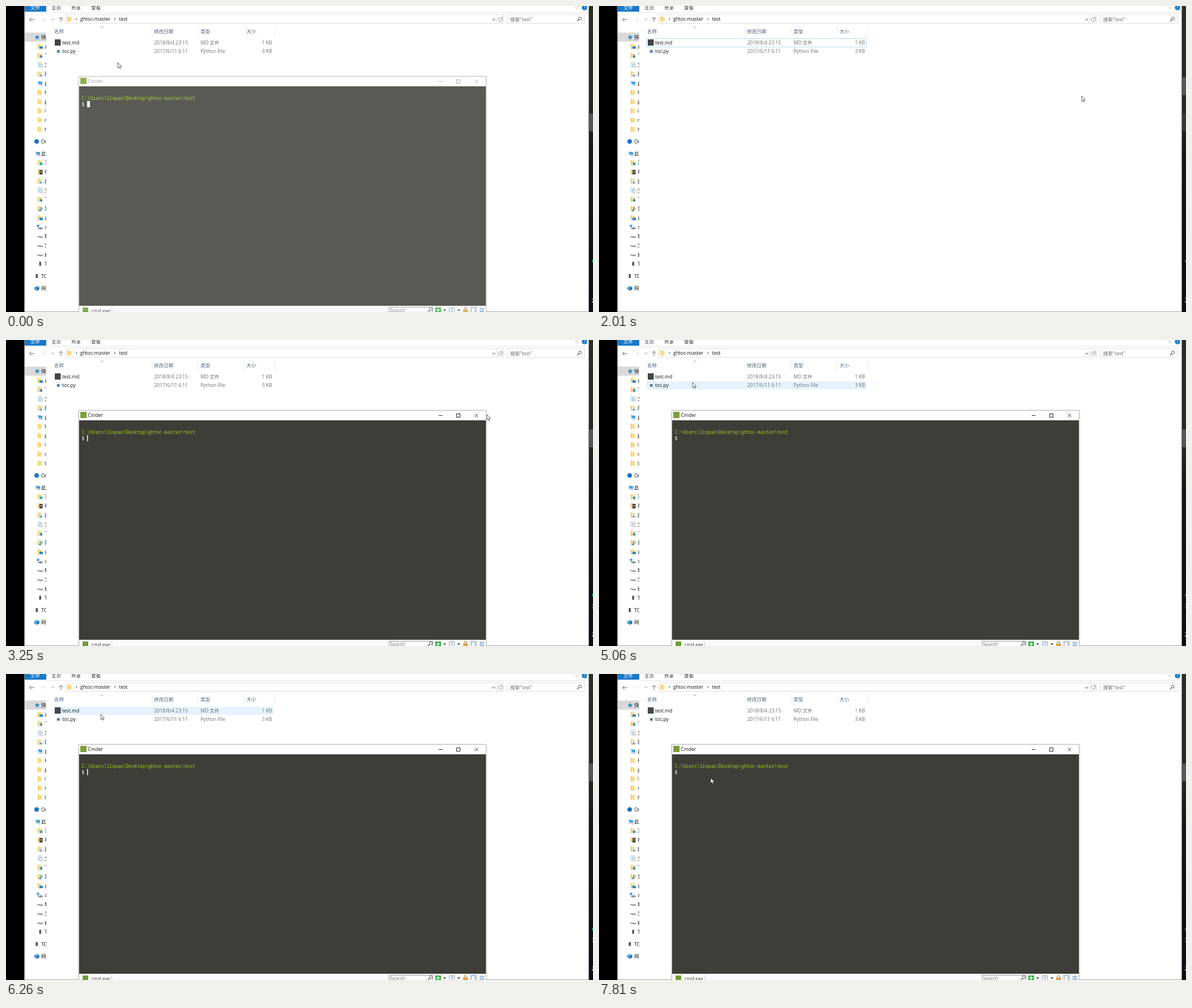
Write an HTML page that moves like this. It is 1035 px wide and 541 px high and loops after 8 s.

```html
<!DOCTYPE html>
<html>
<head>
<meta charset="utf-8">
<title>Folder and console</title>
<style>
html, body { margin: 0; width: 100%; height: 100%; overflow: hidden; background: #fff; }
svg { display: block; }
text { font: 8.5px "Open Sans", "Noto Sans CJK SC", "Noto Sans CJK", sans-serif; white-space: pre; }
.mono { font-family: "Noto Sans Mono", "DejaVu Sans Mono", monospace; font-size: 8.13px; }
.tiny { font-size: 1.5px; }
.line { fill: none; stroke: #555; }
</style>
</head>
<body>
<svg id="stage" width="1035" height="541" viewBox="0 0 1035 541"></svg>
<script>
const LOOP = 8000;
const PROMPT = 'C:\\Users\\linpao\\Desktop\\ghtoc-master\\test';

const rect = (x, y, w, h, fill, more = '') =>
  `<rect x="${x}" y="${y}" width="${w}" height="${h}" fill="${fill}" ${more}/>`;
const box = (x, y, w, h, stroke, fill = 'none', more = '') => rect(x, y, w, h, fill, `stroke="${stroke}" ${more}`);
const text = (x, y, s, fill = '#111', more = '') => `<text x="${x}" y="${y}" fill="${fill}" ${more}>${s}</text>`;
const line = (d, stroke = '#555', width = 1) => `<path class="line" d="${d}" style="stroke:${stroke};stroke-width:${width}"/>`;
const shape = (d, fill) => `<path d="${d}" fill="${fill}"/>`;
const group = (id, body) => `<g id="${id}">${body}</g>`;

// Sidebar icons, centred on 0,0
const folder = shape('M-4-4.5h3l1 1h3v8h-7z', '#f9dc86') + rect(-4, -4.5, 1.5, 9, '#efc862');
const page = box(-3.5, -4.5, 6, 8, '#9db3c4', '#fff', 'stroke-width=".7"') + line('M-2-2h3M-2 0h3M-2 2h3', '#5b9bd0', .7);
const icons = {
  folder,
  desktop: folder + rect(-1, 0, 6, 4, '#1683d8'),
  down: folder + shape('M1-1.500h2v2.500h2l-3 3.500-3-3.500h2z', '#1683d8'),
  doc: page + rect(0, -1, 4.5, 5.5, '#e4f0f8', 'stroke="#8aa3b6" stroke-width=".6"'),
  pic: folder + rect(-1, -1, 5.5, 5, '#cfe6f7') + shape('M-1 4l2-3 3.500 3z', '#4a8fc0'),
  pc: shape('M-4-3.500l8 1v5l-6-1z', '#3ea2e8') + line('M-4 2l6 2h3', '#8b99a3', .8),
  cube: folder + '<circle cx="2" cy="2" r="2.500" fill="#29a3c8"/>',
  film: folder + rect(-1, -3.5, 5.5, 8, '#45413c') + rect(.5, -1, 2.5, 2, '#c7c2b5'),
  music: folder + line('M1 3v-5l3 1v3', '#1683d8') + '<circle cx="0" cy="3" r="1.600" fill="#1683d8"/>',
  system: rect(-5.5, -4, 4, 4, '#2e9be6') + shape('M-4 1.500l6-1.500 3 2-4 2z', '#999') + line('M-4 2l5 2 4-2', '#555', .8),
  drive: shape('M-5 0l5-1.500 5 1.500-3 1.500z', '#e0e0e0') + shape('M-5 0l7 1.500 3-1.500v1.500l-3 1.500-7-2z', '#666'),
  dark: rect(-1.5, -3.5, 3.5, 7, '#555'),
  cloud: '<circle r="4" fill="#1474cc"/>',
  star: shape('M0-4.500l1.300 3 3.200.3-2.400 2.200.7 3.300L0 2.600l-2.800 1.700.7-3.300-2.400-2.200 3.200-.3z', '#2f8ad0'),
  net: shape('M-4.500-1.500l5-2.500 4 1.500v4.500l-4 2.500-5-2.500z', '#4aa4dc') + shape('M.5 0l4-2v4l-4 2.500z', '#1d6fa8')
};

// Icon and label of each indented entry, from the top
const quick = ['desktop 桌面', 'down 下载', 'doc 文档', 'pic 图片', 'pc 此电脑', 'folder H', 'folder g', 'folder i', 'folder r', 'folder t'];
const disks = ['cube 3D', 'film 视频', 'pic 图片', 'doc 文档', 'down 下载', 'music 音乐', 'desktop 桌面', 'system 本地', 'drive 软件', 'drive 文档', 'drive 娱乐', 'dark T'];

function entry(spec, x, y, labelX) {
  const [icon, label] = spec.split(' ');
  return `<g transform="translate(${x} ${y})">${icons[icon]}</g>` + text(labelX, y + 3, label);
}
const entries = (list, top) => list.map((s, i) => entry(s, 60, top + i * 16.25, 68)).join('');

const sidebar = `<g clip-path="url(#side)">` + rect(33, 47, 38, 16, '#d9d9d9') +
  entry('star 快速', 55, 55, 62) + entries(quick, 71.5) +
  entry('cloud Or', 54, 239.5, 62) + entry('pc 此电脑', 56, 261, 62) + entries(disks, 277) +
  entry('dark TC', 54, 477.5, 62) + entry('net 网络', 54, 499, 62) + '</g>';

const lens = (x, y) => `<circle class="line" cx="${x + 1}" cy="${y - 1}" r="2.500"/>` +
  line(`M${x - 1} ${y + 1}l-3 3`, '#555', 1.2);

const ribbon = rect(33, 0, 38, 10, '#1979ca') + text(43, 6, '文件', '#fff') +
  ['主页', '共享', '查看'].map((s, i) => text(80 + i * 35, 6, s, '#333')).join('') +
  line('M71 11.500H1027', '#e6e6e6') + line('M1003 1.500l3 3 3-3', '#aaa') +
  '<circle cx="1020" cy="3" r="4.700" fill="#1979ca"/>' + text(1018, 6, '?', '#fff', 'font-weight="700"');

const address = line('M50 24H42M45 20.500L41.500 24l3.500 3.500', '#555', .9) +
  line('M62 24h8M67 20.500l3.500 3.500-3.500 3.500', '#d8d8d8', .9) +
  line('M80.500 22.500l2 2 2-2', '#777') + line('M97 28V20M93.500 23.500L97 20l3.500 3.500', '#555', .9) +
  box(105.5, 15.5, 772, 15, '#dedede') + `<g transform="translate(112.500 23)">${folder}</g>` +
  line('M123 21l2 2-2 2M191 21l2 2-2 2', '#555') +
  text(131, 26, 'ghtoc-master') + text(199.5, 26, 'test') +
  line('M857.500 22.500l2.500 3 2.500-3', '#555') + line('M865.500 16v14', '#dedede') +
  line('M874 21a3.500 3.500 0 1 1-3.500-.5M874.500 18.500v3h-3', '#777', .9) +
  box(883.5, 15.5, 137, 15, '#dedede') + text(889, 26.5, '搜索"test"', '#666') + lens(1011, 23);

const header = [[85, '名称'], [261, '修改日期'], [343, '类型'], [424, '大小']]
  .map(([x, s]) => text(x, 48, s, '#4c607a')).join('') +
  line('M257.500 36v17M338.500 36v17M419.500 36v17M474.500 36v17', '#ebebeb') +
  line('M166.500 39l2.500-2.500 2.500 2.500', '#888', .9);

const fileRow = (y, name, date, type, size) => text(99, y, name) + text(261.5, y, date, '#6d6d6d') +
  text(343, y, type, '#6d6d6d') + text(469, y, size, '#6d6d6d', 'text-anchor="end"');

const files = rect(86, 59, 10.5, 11, '#454545') +
  box(88.5, 75.5, 7, 8.5, '#e4e4e4', '#fff') + rect(90, 78, 4.5, 4.5, '#4378a8') +
  fileRow(68.3, 'test.md', '2018/8/4 23:15', 'MD 文件', '1 KB') +
  fileRow(83, 'toc.py', '2017/6/11 6:11', 'Python File', '3 KB');

const taskbar = rect(1027.5, 0, 8, 541, 'url(#bar)') +
  [126, 158, 190].map(y => rect(1027.5, y, 8, 31.5, '#55585a', `id="task${y}"`)).join('') +
  '<circle cx="1037" cy="451" r="3.500" fill="#18b070"/>' +
  text(1032.5, 524, '2', '#fff') + text(1033, 474, '3', '#fff', 'id="mark"');

const preview = rect(881, 126, 147, 106, '#515151', 'filter="url(#shadow)"') +
  rect(887, 132, 9.5, 9.5, '#7faa1c') + text(902, 140, '管理员: cmd (Admin)', '#fff') +
  rect(886, 149, 135, 79, '#292a25') + text(887.5, 153, PROMPT, '#86a82b', 'class="mono tiny"');

const statusBar = rect(129, 530, 717, 11, '#fafafa') + rect(131, 530, 55, 11, '#fff') +
  line('M186.500 532v9', '#ccc') + rect(135, 533, 10, 9, '#6f9c35') + text(150.5, 541.5, 'cmd.exe', '#333') +
  box(675.5, 532.5, 77, 12, '#999', '#fff') + text(677, 541, 'Search', '#777', 'font-style="italic"') + lens(748, 537) +
  rect(757, 533, 10, 9, '#35b045') + line('M759 537.500h6M762 534.500v6', '#fff', 1.7) +
  shape('M771 536.500h5l-2.500 3zM796 536.500h5l-2.500 3z', '#333') +
  box(781.5, 533.5, 9, 9, '#8fabc4', '#e9f1f8') + line('M786.500 534v7', '#8fabc4') +
  line('M808 537v-1.500a2 2 0 0 1 4.500 0V537', '#a8874a', 1.2) + rect(806, 537, 8.5, 5, '#d7a348') +
  rect(818, 531, 13, 10, '#d5e4f3') + box(820.5, 533.5, 8, 8, '#9aa8b5', '#fff') + line('M826.500 534v7', '#9aa8b5') +
  line('M835 534.500h8M835 537.500h8M835 540.500h8', '#3c70b8');

const consoleWin = rect(129, 125, 717, 420, '#fff', 'filter="url(#shadow)"') +
  rect(131, 127, 11, 11, '#7f9f35') +
  group('caption', text(144.5, 136, 'Cmder') + line('M763 133.500h6.500', '#222') +
    box(794.5, 130.5, 6, 6, '#222') + line('M826.500 130.500l6 6M832.500 130.500l-6 6', '#222', .9)) +
  rect(129, 142, 717, 388, '#3e3e38') +
  text(133.5, 166, PROMPT, '#a1d21c', 'class="mono"') + text(133.5, 177, '$', '#fff', 'class="mono"') +
  rect(143, 168, 1.5, 11, '#fff', 'id="caret"') + statusBar +
  box(128.5, 124.5, 718, 420, '#b8b8b8');

document.getElementById('stage').innerHTML = `<defs>
  <clipPath id="side"><path d="M33 0h38v541H33z"/></clipPath>
  <linearGradient id="bar" x2="0" y2="1"><stop stop-color="#2b2d29"/><stop offset=".35" stop-color="#262824"/>
    <stop offset=".5" stop-color="#12171a"/><stop offset="1" stop-color="#0a0e14"/></linearGradient>
  <filter id="shadow"><feDropShadow dx="0" dy="1" stdDeviation="2" flood-opacity=".3"/></filter></defs>` +
  rect(0, 0, 1035, 541, '#fff') + rect(0, 0, 32.5, 541, '#000') +
  rect(83, 58, 389, 14.5, '#e5f3ff', 'id="hover"') +
  box(83.5, 57.5, 388, 15, '#b4dcf6', 'none', 'id="focus"') +
  ribbon + address + header + files + sidebar + line('M33 540.500H1027', '#aaa') +
  group('preview', preview) + group('console', consoleWin) + taskbar +
  group('mouse', '<path d="M0 0V9.300L2.200 7.300 3.700 10.700 5.100 10.100 3.700 6.800H6.600Z" fill="#fff" stroke="#222" stroke-width=".7"/>');

// First change, last change and number of changes in each burst, on a 10 ms clock
const bursts = [[150, 1180, 8], [1310, 2010, 6], [2440, 3370, 8], [3520, 4340, 7],
  [4640, 5570, 8], [5710, 6680, 8], [6800, 7350, 5]];
const ticks = bursts.flatMap(([a, b, n]) =>
  Array.from({ length: n }, (_, i) => a + 10 * Math.floor((b - a) * i / (n - 1) / 10)));

// Pointer path: time, x, y
const path = [[0, 197, 100], [150, 197, 100], [1180, 549, 150], [2010, 851, 159], [2440, 851, 159],
  [3100, 848, 132], [3370, 848, 132], [4340, 190, 182], [4640, 188, 180], [5030, 165, 75], [5060, 165, 75],
  [5570, 120, 21], [5710, 110, 16], [5975, 74, 45], [6240, 167, 71], [6300, 167, 71],
  [6680, 196, 133], [6800, 196, 133], [7210, 197, 184], [LOOP, 197, 184]];
const caretOff = [[3520, 4100], [4640, 5180], [5710, 6250], [6800, 7350], [7810, LOOP]];

function pointer(t) {
  const i = path.findIndex(p => p[0] > t);
  const [t0, x0, y0] = path[i - 1], [t1, x1, y1] = path[i];
  const k = (t - t0) / (t1 - t0);
  return [x0 + (x1 - x0) * k, y0 + (y1 - y0) * k];
}

const el = id => document.getElementById(id);
const show = (id, on) => el(id).style.display = on ? '' : 'none';
const within = (t, a, b) => t >= a && t < b;

function draw(now) {
  const t = now % LOOP;
  const [x, y] = pointer(ticks.findLast(s => s <= t) ?? 0);
  el('mouse').setAttribute('transform', `translate(${x} ${y})`);

  const fading = t < 150, active = t >= 3250;
  show('console', fading || active);
  el('console').style.opacity = fading ? .85 : 1;
  el('caption').style.opacity = fading ? .45 : 1;
  el('caret').setAttribute('width', fading ? 5 : 1.5);
  show('caret', !caretOff.some(([a, b]) => within(t, a, b)));

  show('focus', within(t, 150, 2990));
  show('preview', within(t, 2710, 3250));
  show('task126', within(t, 1800, 3250));
  show('task158', t >= 2990);
  el('task158').style.opacity = active ? 1 : .4;
  show('task190', t < 2990);
  el('task190').style.opacity = fading ? 1 : .4;
  show('mark', active);

  const row = Math.floor((y - 58) / 14.7);
  show('hover', t > 4640 && x >= 83 && (row === 0 || row === 1));
  el('hover').setAttribute('y', 58 + row * 14.7);
  requestAnimationFrame(draw);
}
requestAnimationFrame(draw);
</script>
</body>
</html>
```
